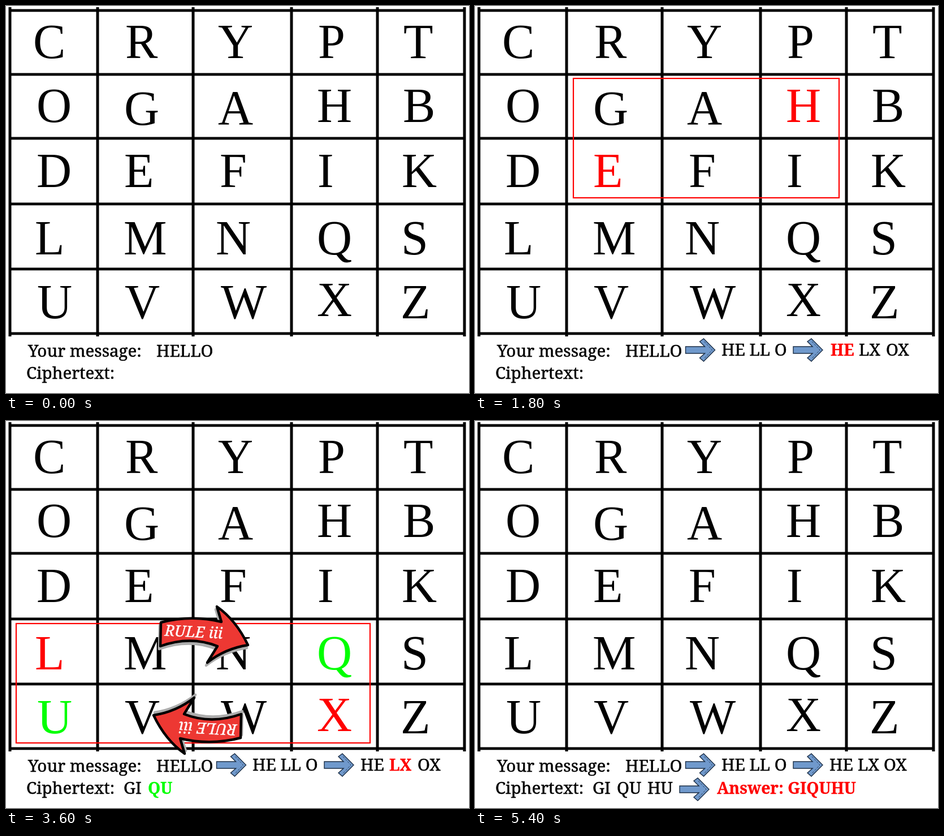
These frames come from a looping animation (819 px wide and 684 px high, 6 s). An HTML page with a canvas:

```html
<!DOCTYPE html>
<html lang="en">
<head>
<meta charset="utf-8">
<title>Digraph cipher</title>
<style>
html, body { margin: 0; width: 100%; height: 100%; overflow: hidden; background: #fff; }
canvas { display: block; }
</style>
</head>
<body>
<canvas id="stage" width="819" height="684"></canvas>
<script>
const ctx = document.getElementById('stage').getContext('2d');
const RED = '#ff0000', GREEN = '#00ff00', BLACK = '#000';
const STEP = 600, STEPS = 10;

const COLS = [7, 162, 331, 505, 657, 811];
const ROWS = [8, 121, 234, 350, 465, 579];

// Each row: letters, left ink edges, baselines
const LETTERS = [
  ['CRYPT', [51, 213, 375, 554, 704], [92, 92, 92, 92, 92]],
  ['OGAHB', [57, 212, 375, 552, 704], [205, 210, 209, 205, 205]],
  ['DEFIK', [56, 211, 380, 554, 702], [320, 320, 320, 320, 320]],
  ['LMNQS', [53, 210, 373, 553, 704], [439, 439, 439, 439, 439]],
  ['UVWXZ', [56, 210, 380, 551, 702], [552, 552, 552, 548, 552]]
];

// One entry per digraph: plain pair, its cipher pair, frame and rule arrows
const PAIRS = [
  { plain: 'HE', code: 'GI', box: [174, 128, 644, 339],
    arrows: [[414, 162, -1, 0], [417, 324, -1, 1]], xs: [629, 680, 728] },
  { plain: 'LX', code: 'QU', box: [18, 358, 644, 569],
    arrows: [[350, 378, 1, 0], [339, 538, 1, 1]], xs: [628, 678, 729] },
  { plain: 'OX', code: 'HU', box: [18, 128, 644, 569],
    arrows: [[350, 148, 1, 0], [339, 538, 1, 1]], xs: [628, 678, 724] }
];
const CODE_X = [209, 252, 306];

function inkText(str, x, y, font, color, weight = 0) {
  ctx.font = font;
  ctx.fillStyle = ctx.strokeStyle = color;
  const left = x + ctx.measureText(str).actualBoundingBoxLeft;
  ctx.fillText(str, left, y);
  if (weight) {
    ctx.lineWidth = weight;
    ctx.strokeText(str, left, y);
  }
}

function label(str, x, y, color = BLACK) {
  const bold = color !== BLACK;
  const font = (bold ? 'bold 28.3px' : '29.5px') + ' "Noto Serif", serif';
  inkText(str, x, y, font, color, bold ? 0.3 : 0.5);
}

function grid() {
  ctx.fillStyle = BLACK;
  for (const x of COLS) ctx.fillRect(x - 2.5, 2, 5, 582);
  for (const y of ROWS) ctx.fillRect(5, y - 2.5, 808, 4.8);
}

function letters(pair, solved) {
  for (const [chars, xs, ys] of LETTERS) {
    [...chars].forEach((ch, i) => {
      let color = BLACK;
      if (pair && pair.plain.includes(ch)) color = RED;
      else if (solved && pair.code.includes(ch)) color = GREEN;
      inkText(ch, xs[i], ys[i], '86px "Liberation Serif", serif', color);
    });
  }
}

function blueArrow(x, y) {
  ctx.save();
  ctx.translate(x, y);
  ctx.beginPath();
  [[0, -6], [34, -6], [25, -15], [32, -20], [52, 0], [32, 20], [25, 14], [34, 6], [0, 6]]
    .forEach(([px, py]) => ctx.lineTo(px, py));
  ctx.closePath();
  ctx.fillStyle = '#7099cc';
  ctx.strokeStyle = '#1c2f47';
  ctx.lineWidth = 1.4;
  ctx.fill();
  ctx.stroke();
  ctx.beginPath();
  ctx.moveTo(33, -15);
  ctx.lineTo(47, 0);
  ctx.lineTo(33, 15);
  ctx.setLineDash([4, 2]);
  ctx.lineWidth = 0.8;
  ctx.stroke();
  ctx.restore();
}

function rulePath() {
  const p = new Path2D();
  p.moveTo(-76, -22);
  p.quadraticCurveTo(-22, -36, 31, -23);
  p.lineTo(23, -50);
  p.quadraticCurveTo(57, -26, 78, 18);
  p.quadraticCurveTo(38, 24, 6, 49);
  p.lineTo(24, 20);
  p.quadraticCurveTo(-24, 1, -77, 20);
  p.closePath();
  return p;
}
const RULE = rulePath();

function ruleArrow([x, y, dir, turned]) {
  ctx.save();
  ctx.translate(x, y);
  if (turned) ctx.rotate(Math.PI);

  ctx.save();
  ctx.scale(dir, 1);
  ctx.lineJoin = 'round';
  ctx.lineWidth = 4.5;
  ctx.translate(-2, 5);
  ctx.fillStyle = ctx.strokeStyle = '#adadad';
  ctx.fill(RULE);
  ctx.stroke(RULE);
  ctx.translate(2, -5);
  ctx.fillStyle = '#ed3833';
  ctx.strokeStyle = BLACK;
  ctx.fill(RULE);
  ctx.stroke(RULE);
  ctx.restore();

  ctx.translate(dir > 0 ? -18 : 2, dir > 0 ? -6 : -1);
  ctx.rotate(dir * 0.05);
  ctx.font = 'italic 27px "Noto Serif", serif';
  ctx.textAlign = 'center';
  ctx.fillStyle = ctx.strokeStyle = '#fff';
  ctx.lineWidth = 0.5;
  ctx.fillText('RULE iii', 0, 10);
  ctx.strokeText('RULE iii', 0, 10);
  ctx.restore();
}

function messages(step, active, solved) {
  label('Your message:', 38, 620);
  label('HELLO', 267, 620);
  label('Ciphertext:', 37, 659);
  if (step >= 1) {
    blueArrow(372.5, 608);
    label('HE LL O', 437, 618);
  }
  if (step >= 2) {
    blueArrow(563, 608);
    const xs = active < 0 ? [628, 678, 724] : PAIRS[active].xs;
    PAIRS.forEach((p, i) => label(p.plain, xs[i], 618, i === active ? RED : BLACK));
  }
  PAIRS.forEach((p, i) => {
    if (step >= 4 + 2 * i) {
      label(p.code, CODE_X[i], 659, i === active && solved ? GREEN : BLACK);
    }
  });
  if (step === 9) {
    blueArrow(362, 651);
    label('Answer: GIQUHU', 428, 659, RED);
  }
}

function draw(step) {
  const active = step >= 3 && step <= 8 ? Math.floor((step - 3) / 2) : -1;
  const solved = active >= 0 && step % 2 === 0;
  const pair = PAIRS[active];

  ctx.fillStyle = '#fff';
  ctx.fillRect(0, 0, 819, 684);
  grid();
  letters(pair, solved);
  if (pair) {
    const [l, t, r, b] = pair.box;
    ctx.strokeStyle = RED;
    ctx.lineWidth = 2.2;
    ctx.strokeRect(l, t, r - l, b - t);
    if (solved) pair.arrows.forEach(ruleArrow);
  }
  messages(step, active, solved);
}

const start = performance.now();
function tick() {
  draw(Math.floor((performance.now() - start) / STEP) % STEPS);
  requestAnimationFrame(tick);
}
tick();
</script>
</body>
</html>
```
